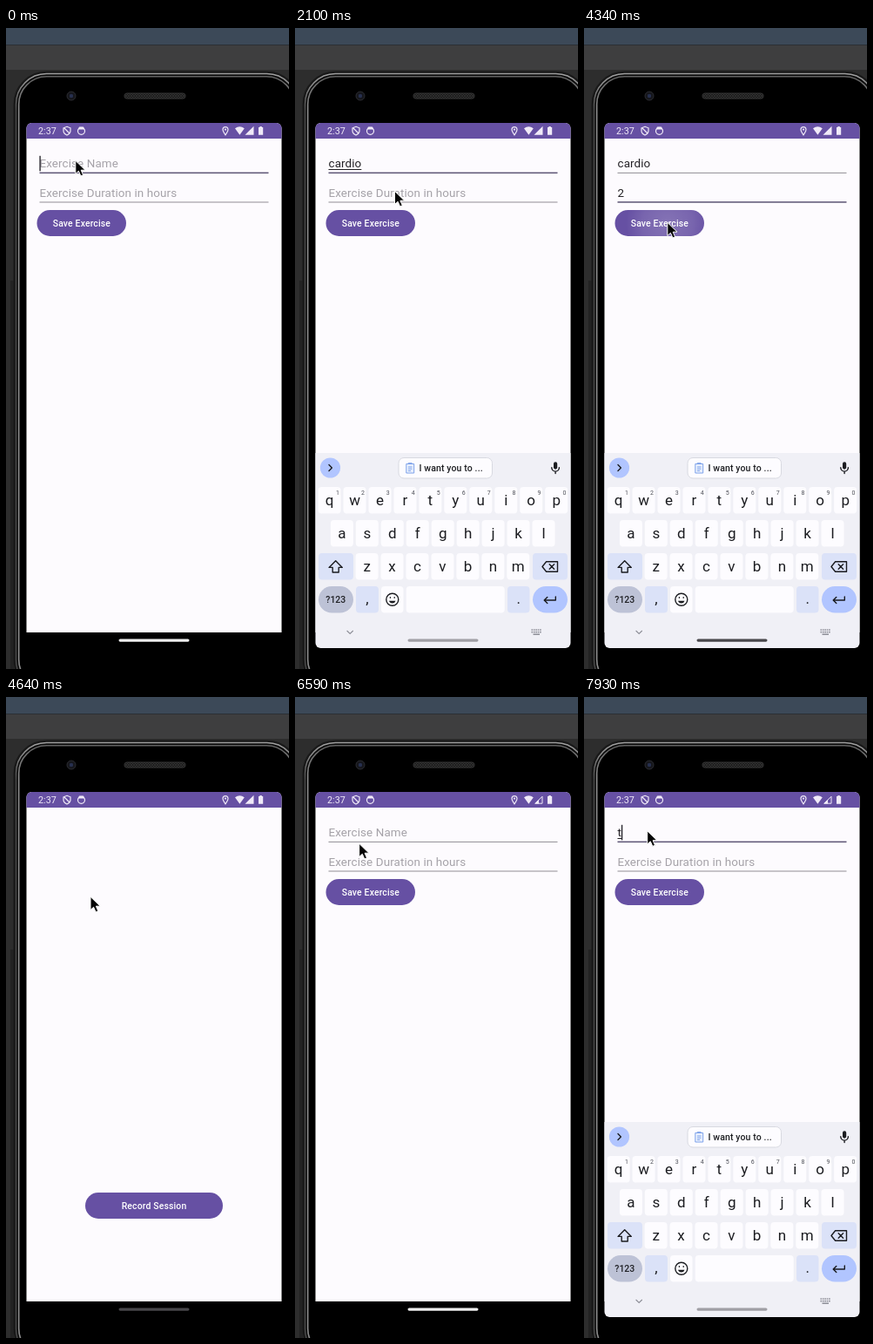
Recreate the animation shown at these times as an HTML page. Size 325 px wide and 736 px high, loop 8000 ms.

```html
<!DOCTYPE html>
<html lang="en">
<head>
<meta charset="utf-8">
<title>Exercise log on a phone</title>
<style>
  html, body { margin: 0; width: 100%; height: 100%; overflow: hidden; background: #2d2d2d; }
  svg { display: block; width: 325px; height: 736px; font-family: Roboto, sans-serif; }
  .field { font-size: 13.43px; letter-spacing: .1px; fill: #232125; }
  .hint { font-size: 13.43px; letter-spacing: .1px; fill: #a5a2a8; }
  .label { font-size: 10.44px; font-weight: 500; letter-spacing: .14px; fill: #fff; text-anchor: middle; }
  .item { font-size: 10.44px; fill: #37353a; }
  .key { font-size: 17px; fill: #1b1c20; text-anchor: middle; }
  .sup { font-size: 7px; fill: #4d4f57; text-anchor: middle; }
  .small { font-size: 10.5px; font-weight: 500; fill: #1f2024; }
  .line { fill: none; stroke: #1b1c20; stroke-width: 1.4; stroke-linejoin: round; stroke-linecap: round; }
</style>
</head>
<body>
<svg viewBox="0 0 325 736">
  <defs>
    <clipPath id="glass"><rect x="23.5" y="109" width="293" height="603" rx="6"/></clipPath>
    <clipPath id="saveClip"><rect x="35.5" y="209" width="102.5" height="30" rx="15"/></clipPath>
    <clipPath id="recordClip"><rect x="91" y="569" width="158" height="30" rx="15"/></clipPath>
    <radialGradient id="glow">
      <stop offset="0" stop-color="#fff" stop-opacity=".2"/>
      <stop offset=".6" stop-color="#fff" stop-opacity=".12"/>
      <stop offset="1" stop-color="#fff" stop-opacity="0"/>
    </radialGradient>
    <linearGradient id="outerRim" gradientUnits="userSpaceOnUse" x1="0" y1="52" x2="0" y2="95">
      <stop offset="0" stop-color="#a2a2a2"/>
      <stop offset="1" stop-color="#4c4c4c"/>
    </linearGradient>
    <linearGradient id="innerRim" gradientUnits="userSpaceOnUse" x1="0" y1="55" x2="0" y2="95">
      <stop offset="0" stop-color="#626262"/>
      <stop offset="1" stop-color="#8b8b8b"/>
    </linearGradient>
    <pattern id="mesh" width="3" height="3" patternUnits="userSpaceOnUse">
      <path d="M0 0L3 3M3 0L0 3" stroke="#3a3a3a" stroke-width=".6"/>
    </pattern>
  </defs>

  <!-- desktop and phone body -->
  <rect width="325" height="736" fill="#2d2d2d"/>
  <rect width="325" height="19.5" fill="#3c4958"/>
  <rect y="19" width="325" height="1.2" fill="#2b2f34"/>
  <rect y="20" width="325" height="28" fill="#3e3e3f"/>
  <rect x="5" y="290" width="4" height="446" fill="#232323"/>
  <rect x="9.5" y="50.5" width="327" height="712" rx="37" fill="#0b0b0b" stroke="#191919" stroke-width="2"/>
  <rect x="11.5" y="52.6" width="323" height="708" rx="35" fill="none" stroke="url(#outerRim)" stroke-width="1.5"/>
  <rect x="14.7" y="55.8" width="316.3" height="701.2" rx="32" fill="#000" stroke="url(#innerRim)" stroke-width="1.6"/>
  <circle cx="75" cy="78" r="5" fill="#15161b" stroke="#2b2c31"/>
  <circle cx="75" cy="78" r="2.2" fill="#27304f"/>
  <rect x="135.5" y="74.5" width="71" height="7" rx="3.5" fill="#1a1a1a"/>
  <rect x="136" y="75" width="70" height="6" rx="3" fill="url(#mesh)" stroke="#353535" stroke-width=".8"/>

  <g clip-path="url(#glass)">
    <rect x="23" y="109" width="294" height="585" fill="#fdfbfe"/>
    <rect x="23" y="109" width="294" height="18" fill="#6650a3"/>
    <g fill="#f0eaf8">
      <text x="37" y="122" font-size="10.8">2:37</text>
      <g fill="none" stroke="#f0eaf8" stroke-width="1.2">
        <path d="M70 113.3L74 114.8V118Q74 121.4 70 123Q66 121.4 66 118V114.8ZM67 115L73 121"/>
        <circle cx="86.5" cy="118.3" r="4"/>
        <path d="M252 122.8Q249 118.8 249 116.6A3 3 0 0 1 255 116.6Q255 118.8 252 122.8Z"/>
      </g>
      <path d="M82.8 116.5L84 113.5H89L90.2 116.5ZM263 115.2Q268.4 111.4 273.8 115.2L268.4 122.8Z"/>
      <circle cx="252" cy="116.6" r="1.1"/>
      <path id="signalFull" d="M274.5 122.8H284.5V112.8Z"/>
      <g id="signalLow">
        <path d="M276 122.2H284V114.2Z" fill="none" stroke="#f0eaf8"/>
        <path d="M275 122.6H280V117.8Z"/>
      </g>
      <path d="M291.4 113H293.8V114H295.2V122.8H290V114H291.4Z"/>
    </g>

    <g id="form">
      <text class="hint" id="hint1" x="38.5" y="160.2">Exercise Name</text>
      <text class="field" id="text1" x="38.5" y="160.2"></text>
      <rect id="compose" x="38.5" y="162" height="1" fill="#232125"/>
      <rect id="rule1" x="38.5" width="263"/>
      <text class="hint" id="hint2" x="38.5" y="194">Exercise Duration in hours</text>
      <text class="field" id="text2" x="38.5" y="194"></text>
      <rect id="rule2" x="38.5" width="263"/>
      <rect id="caret" width="1.4" height="17.5" fill="#2b2930"/>
      <rect x="35.5" y="209" width="102.5" height="30" rx="15" fill="#6650a3"/>
      <g clip-path="url(#saveClip)"><circle id="saveRipple" cx="96" cy="224" r="48" fill="url(#glow)"/></g>
      <text class="label" x="86.9" y="228">Save Exercise</text>
    </g>

    <g id="list">
      <g id="entry">
        <text class="item" x="47.4" y="162.6" font-weight="700">cardio</text>
        <text class="item" x="47.4" y="177">2 Hrs</text>
      </g>
      <rect x="91" y="569" width="158" height="30" rx="15" fill="#6650a3"/>
      <g clip-path="url(#recordClip)"><circle id="recordRipple" cx="160" cy="583" r="60" fill="url(#glow)"/></g>
      <text class="label" x="170" y="588">Record Session</text>
    </g>

    <g id="board">
      <rect x="23" y="488" width="294" height="240" fill="#f0f0f6"/>
      <circle cx="40.5" cy="505" r="11.6" fill="#b1c5ff"/>
      <path class="line" d="M39 501.6L42.4 505L39 508.4"/>
      <rect x="119" y="493.5" width="107.5" height="23.5" rx="6" fill="#fdfcff" stroke="#d8d9e0"/>
      <path d="M127.8 500.5H136.7V511H127.8Z" fill="#e8effd" stroke="#7fa3ea"/>
      <path d="M130 499.6H134.5M130 504H134.5M130 506.2H134.5M130 508.4H133" stroke="#7fa3ea"/>
      <text class="small" x="142.5" y="509" letter-spacing=".12">I want you to ...</text>
      <rect x="297" y="498.3" width="4.2" height="8.4" rx="2.1" fill="#1b1c20"/>
      <path class="line" d="M294.8 504.8A4.3 4.3 0 0 0 303.4 504.8M299.1 509.2V511.6"/>
      <g id="keys"></g>
      <path class="line" d="M46.7 611.7L54.3 619.4H50.2V625H43.2V619.4H39.1Z"/>
      <path class="line" d="M288.6 612.7H301.5V624.3H288.6L284 618.5ZM292.2 615.8L297.6 621.2M297.6 615.8L292.2 621.2"/>
      <text class="small" x="46.8" y="660.3" text-anchor="middle">?123</text>
      <g class="line">
        <circle cx="111.8" cy="656.3" r="7"/>
        <path d="M108 657.8A4 4 0 0 0 115.6 657.8Z" fill="#1b1c20" stroke="none"/>
        <path d="M109.4 653.8V654.2M114.2 653.8V654.2"/>
        <path d="M299.3 653V657H286.4M289.8 653.5L286.2 657L289.8 660.5"/>
      </g>
      <g fill="none" stroke="#8e8f98" stroke-width="1.1">
        <path d="M59.6 692L63.2 695.5L66.8 692"/>
        <path d="M271.5 691H283M271.5 693.6H283" stroke-width="1.6" stroke-dasharray="1.6 .8"/>
        <path d="M273.5 696.2H281" stroke-width="1.4"/>
      </g>
    </g>
  </g>
  <rect id="handle" x="129.5" y="701.5" width="81" height="3.2" rx="1.6"/>
  <path id="pointer" d="M0 -.7V14.5L3.6 11.3L6.1 16.9L8.8 15.7L6.4 10.2H11.2Z" fill="#050505" stroke="#fff" stroke-width="1"/>
</svg>

<script>
const LOOP = 8000;
const $ = id => document.getElementById(id);
const show = (id, on) => $(id).setAttribute('visibility', on ? 'inherit' : 'hidden');
const set = (id, attrs) => { for (const k in attrs) $(id).setAttribute(k, attrs[k]); };

function draw(tag, attrs, text) {
  const el = document.createElementNS('http://www.w3.org/2000/svg', tag);
  for (const k in attrs) el.setAttribute(k, attrs[k]);
  if (text) el.textContent = text;
  $('keys').append(el);
}

function cap(x, y, width, fill = '#fdfcff', rx = 4) {
  draw('rect', { x, y, width, height: 30.5, rx, fill });
}

function row(letters, first, y, numbered) {
  [...letters].forEach((ch, i) => {
    const x = first + i * 28.95;
    cap(x - 13, y, 26);
    draw('text', { class: 'key', x, y: y + 20.8 }, ch);
    if (numbered) draw('text', { class: 'sup', x: x + 9.3, y: y + 8.6 }, String((i + 1) % 10));
  });
}

row('qwertyuiop', 39.6, 527, true);
row('asdfghjkl', 53.9, 565);
row('zxcvbnm', 82.6, 603);
const tint = '#dbe2f8';
cap(27, 603, 40, tint);
cap(273, 603, 40, tint);
cap(27, 641, 40, '#bdc2d6', 15.2);
cap(70, 641, 26, tint);
cap(99, 641, 25.5);
cap(127.7, 641, 113);
cap(244, 641, 25.5, tint);
cap(273, 641, 40, '#b1c5ff', 15.2);
draw('text', { class: 'key', x: 83, y: 661 }, ',');
draw('text', { class: 'key', x: 256.7, y: 661 }, '.');

// Each track holds [start time, value] pairs; a value lasts until the next one.
const tracks = {
  scene: [[0, 'form'], [4490, 'list'], [6290, 'form']],
  name: [[0, ''], [450, 'c'], [600, 'ca'], [1050, 'card'], [1200, 'cardi'], [1350, 'cardio'], [6290, ''], [7330, 't']],
  hours: [[0, ''], [3740, '2'], [6290, '']],
  focus: [[0, 1], [2250, 2], [6290, 0], [6880, 1]],
  caret: [[0, 1], [1800, 0], [2250, 1], [2700, 0], [3440, 1], [4190, 0], [6880, 1]],
  // how far the keyboard has come up
  rise: [[0, 0], [1200, .5], [1350, 1], [4490, .5], [4640, 0], [7330, .5], [7480, 1]],
  handle: [[0, '#eeeeee'], [1950, '#a09fa5'], [2700, '#858489'], [2850, '#66656a'], [3140, '#48474b'],
    [4790, '#77767a'], [5090, '#b0b0b0'], [5390, '#eeeeee'], [7930, '#a09fa5']],
  pointer: [[0, [79.8, 153]], [1650, [84, 157]], [1800, [95, 168]], [1950, [108, 181]], [2100, [114.5, 188]],
    [2250, [114.5, 192]], [2400, [114.5, 196]], [3890, [112, 202]], [4040, [104, 215]], [4190, [97, 223]],
    [4340, [95.8, 224]], [4640, [97, 230]], [4790, [101, 260]], [4940, [112, 340]], [5090, [128, 440]],
    [5240, [146, 530]], [5390, [157, 572]], [5540, [160.3, 581]], [6290, [150, 530]], [6440, [105, 310]],
    [6590, [73.7, 169]], [6730, [73, 160]], [6880, [72.7, 154.5]]],
  save: [[0, 0], [4340, 1], [4490, 0]],
  record: [[0, 0], [6140, 1], [6290, 0]],
  entry: [[0, 0], [4790, 1]],
  lowSignal: [[0, 0], [5090, 1]]
};

function state(t) {
  const s = {};
  for (const k in tracks) s[k] = tracks[k].findLast(([start]) => start <= t)[1];
  return s;
}

function rule(id, y, active) {
  set(id, active ? { y: y - .8, height: 1.5, fill: '#5c5474' } : { y: y - .5, height: 1, fill: '#918e95' });
}

function render(t) {
  const s = state(t);
  const form = s.scene === 'form';
  show('form', form);
  show('list', !form);
  show('entry', s.entry);
  show('signalFull', !s.lowSignal);
  show('signalLow', s.lowSignal);
  show('saveRipple', s.save);
  show('recordRipple', s.record);

  $('text1').textContent = s.name;
  $('text2').textContent = s.hours;
  show('hint1', !s.name);
  show('hint2', !s.hours);
  rule('rule1', 166.4, s.focus === 1);
  rule('rule2', 200, s.focus === 2);
  const width = id => $(id).textContent ? $(id).getComputedTextLength() : 0;
  set('compose', { width: s.focus === 1 ? width('text1') : 0 });
  const second = s.focus === 2;
  set('caret', { x: 38.4 + width(second ? 'text2' : 'text1'), y: second ? 180.5 : 146.8 });
  show('caret', s.caret && s.focus);

  set('board', { transform: `translate(0 ${190 * (1 - s.rise)})`, opacity: s.rise });
  set('handle', { fill: s.handle });
  set('pointer', { transform: `translate(${s.pointer})` });
}

function tick(now) {
  render(now % LOOP);
  requestAnimationFrame(tick);
}
render(0);
requestAnimationFrame(tick);
</script>
</body>
</html>
```
